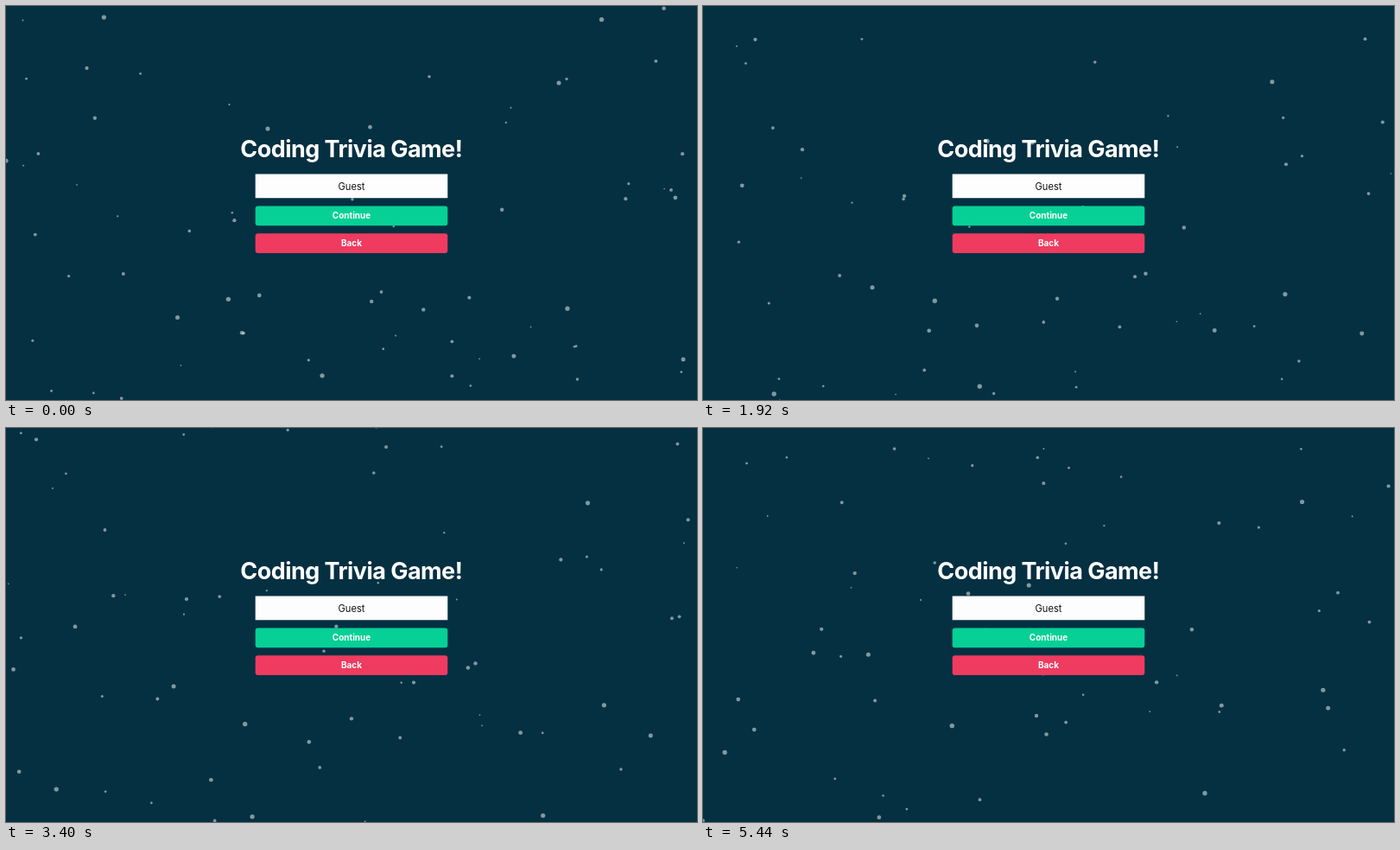
Write an HTML page with a canvas that moves like this. It is 800 px wide and 456 px high and loops after 5480 ms.

```html
<!DOCTYPE html>
<html lang="en">
<head>
<meta charset="utf-8">
<title>Coding Trivia Game</title>
<style>
  html, body { margin: 0; width: 100%; height: 100%; overflow: hidden; background: #053042; }
  canvas { display: block; }
</style>
</head>
<body>
<canvas width="800" height="456"></canvas>
<script>
const W = 800, H = 456, LOOP = 5480, STEP = 40, MARGIN = 10;
const DOTS = 70, SPEED = 133;
const ctx = document.querySelector('canvas').getContext('2d');

let seed = 41;
const rand = (lo, hi) => {
  seed = (seed * 16807) % 2147483647;
  return lo + (hi - lo) * seed / 2147483647;
};

// Each dot drifts in a straight line; dx, dy is its travel over one loop
const dots = Array.from({ length: DOTS }, () => ({
  x: rand(0, W), y: rand(0, H),
  dx: rand(-SPEED, SPEED), dy: rand(-SPEED, SPEED),
  r: rand(.8, 2.7)
}));

const wrap = (v, size) => {
  const span = size + 2 * MARGIN;
  return ((v + MARGIN) % span + span) % span - MARGIN;
};

function dot({ x, y, dx, dy, r }, p) {
  ctx.beginPath();
  ctx.arc(wrap(x + dx * p, W), wrap(y + dy * p, H), r, 0, 2 * Math.PI);
  ctx.fill();
}

function label(text, baseline, size, weight, color, spacing = 0) {
  ctx.font = `${weight} ${size}px Inter, "Open Sans", sans-serif`;
  ctx.letterSpacing = spacing + 'px';
  ctx.textAlign = 'center';
  ctx.fillStyle = color;
  ctx.fillText(text, W / 2 + spacing / 2, baseline);
}

function box(top, height, radius, color) {
  ctx.fillStyle = color;
  ctx.beginPath();
  ctx.roundRect(288.7, top, 222.6, height, radius);
  ctx.fill();
}

function button(text, top, color) {
  box(top, 22.8, 3, color);
  label(text, top + 15, 10, 700, '#fff');
}

const start = performance.now();
function draw() {
  const t = Math.max(0, performance.now() - start) % LOOP;
  const p = Math.floor(t / STEP) * STEP / (LOOP - STEP);
  ctx.fillStyle = '#053042';
  ctx.fillRect(0, 0, W, H);
  ctx.fillStyle = 'rgba(255, 255, 255, .5)';
  for (const d of dots) dot(d, p);

  label('Coding Trivia Game!', 175, 27, 700, '#fff', -.55);
  box(194.6, 27.7, 0, '#fdfdfd');
  label('Guest', 212.6, 11.2, 400, '#111');
  button('Continue', 231.4, '#06d095');
  button('Back', 263.2, '#ef3b60');
  requestAnimationFrame(draw);
}
draw();
</script>
</body>
</html>
```
